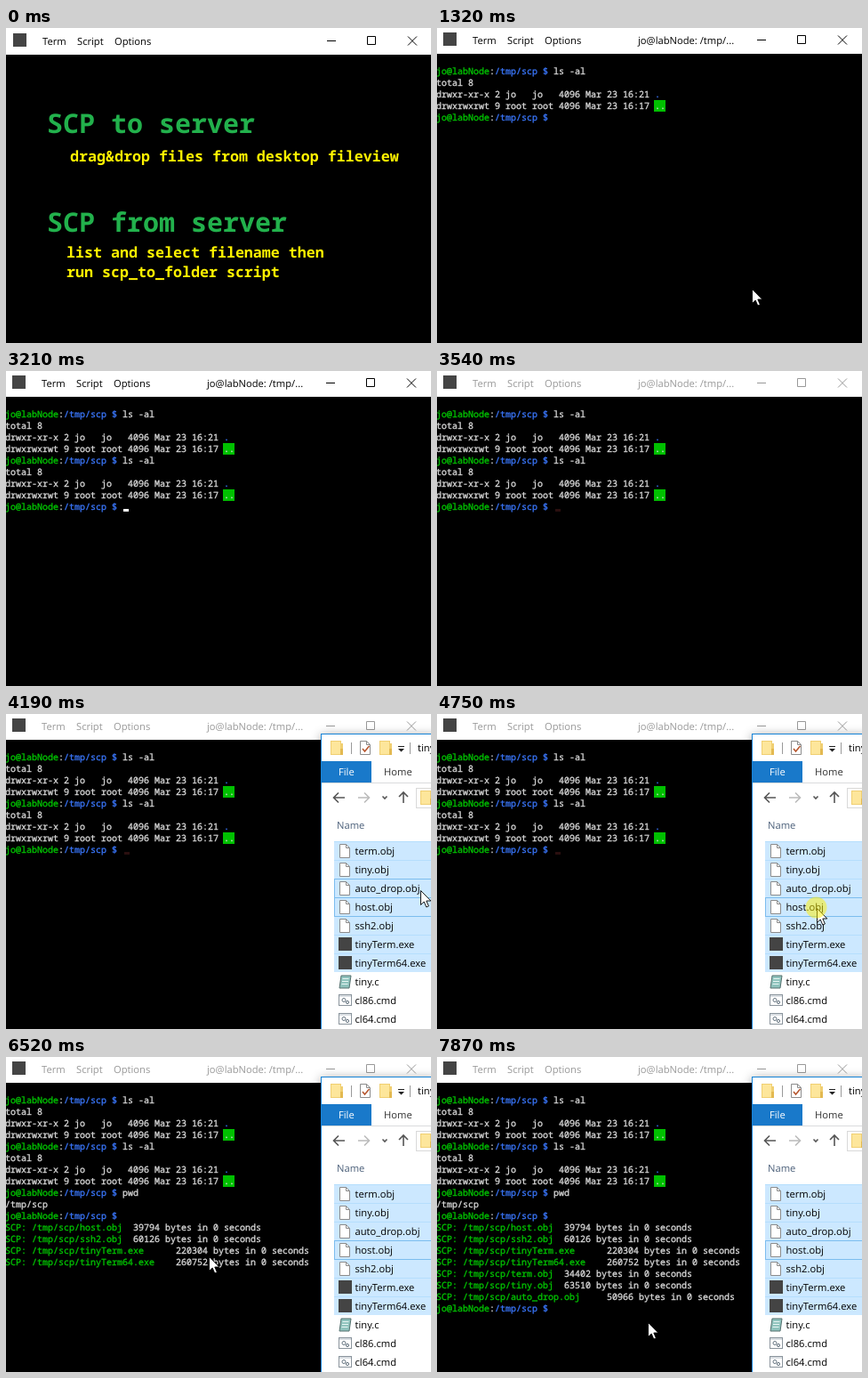
Write an HTML page that moves like this. It is 478 px wide and 354 px high and loops after 8000 ms.

```html
<!DOCTYPE html>
<html lang="en">
<head>
<meta charset="utf-8">
<style>
html, body { margin: 0; width: 100%; height: 100%; overflow: hidden; background: #000; }
svg { display: block; width: 100vw; height: 100vh; }
text { white-space: pre; text-rendering: geometricPrecision; }
.ui { font: 11.2px "Open Sans", "Noto Sans", sans-serif; }
.mono { font: 10px "Noto Sans Mono", "DejaVu Sans Mono", monospace; stroke-width: .3; }
.big { font: bold 30px "Noto Sans Mono", monospace; fill: #22b14c; }
.mid { font: bold 16.67px "Noto Sans Mono", monospace; fill: #fff200; }
.line { fill: none; stroke-width: 1; }
</style>
</head>
<body>
<svg id="stage" viewBox="0 0 478 354">
  <defs>
    <filter id="shadow" x="-20%" y="-10%" width="140%" height="120%">
      <feDropShadow dx="0" dy="2" stdDeviation="6" flood-color="#000" flood-opacity=".4"/>
    </filter>
    <g id="folder">
      <path d="M0 0h12v3h2v13H0z" fill="#f0cf72"/>
      <path d="M1 1h10v14H1z" fill="#fde69b"/>
      <path d="M11 9h3v7h-3z" fill="#e3b951"/>
    </g>
    <g id="page">
      <path d="M1.500 .5h7l4 4v11h-11z" fill="#fff" stroke="#8c8c8c"/>
      <path d="M8.500 .5v4h4" class="line" stroke="#8c8c8c"/>
    </g>
    <rect id="app" width="15" height="15" fill="#444"/>
    <g id="note">
      <path d="M3 1h11l-2 14H1z" fill="#8fc3bd" stroke="#55716f"/>
      <path d="M4.500 4.500h7M4 7.500h7M3.500 10.500h7" class="line" stroke="#e8f6f4"/>
    </g>
    <g id="batch">
      <rect x=".5" y="1.500" width="14" height="12" fill="#fff" stroke="#8a949c"/>
      <path d="M1 3h13" class="line" stroke="#b5bec6"/>
      <circle cx="6" cy="7.500" r="2" class="line" stroke="#63727e"/>
      <circle cx="10" cy="10" r="1.600" class="line" stroke="#63727e"/>
    </g>
  </defs>
  <rect width="478" height="354"/>

  <g id="intro">
    <text class="big" x="46" y="118">SCP to server</text>
    <text class="mid" x="72" y="150">drag&amp;drop files from desktop fileview</text>
    <text class="big" x="46" y="229">SCP from server</text>
    <text class="mid" x="68" y="258">list and select filename then</text>
    <text class="mid" x="68" y="280">run scp_to_folder script</text>
  </g>

  <g id="term" class="mono"></g>
  <rect id="caret" width="6" height="3"/>

  <g id="bar">
    <rect x="-1" y="-1" width="480" height="30" fill="#fff"/>
    <use href="#app" x="7" y="5"/>
    <g id="menu" class="ui">
      <text x="40" y="18">Term</text>
      <text x="79" y="18">Script</text>
      <text x="121" y="18">Options</text>
      <text id="title" x="226" y="18">jo@labNode: /tmp/...</text>
    </g>
    <path id="buttons" class="line" d="M360 13.500h10M405.500 8.500h9v9h-9zM451 8.500l10 10M461 8.500l-10 10"/>
  </g>

  <g id="explorer" class="ui">
    <rect x="354.500" y="22.500" width="130" height="340" fill="#fff" stroke="#1883d7" filter="url(#shadow)"/>
    <use href="#folder" x="365" y="30"/>
    <use href="#page" x="397" y="30"/>
    <path d="M401 39l2.500 3 5-6" class="line" stroke="#b5532a" style="stroke-width:1.500"/>
    <use href="#folder" x="420" y="30"/>
    <path d="M388.500 32v13M454.500 32v13" class="line" stroke="#999"/>
    <path d="M441 36h7v1h-7zM441 39h7l-3.500 3.500z" fill="#222"/>
    <text x="463" y="42">tiny</text>
    <rect x="355" y="53" width="56" height="24" fill="#1979ca"/>
    <text x="374" y="69" fill="#fff">File</text>
    <text x="425" y="69" fill="#333">Home</text>
    <path d="M355 77.500h123" class="line" stroke="#dadbdc"/>
    <g class="line" style="stroke-width:1.600">
      <path d="M381 94h-12M374 88.500l-5.500 5.500 5.500 5.500" stroke="#555"/>
      <path d="M396 94h12M403 88.500l5.500 5.500-5.500 5.500" stroke="#bbb"/>
      <path d="M423.500 92.500l2.500 2.500 2.500-2.500" stroke="#555"/>
      <path d="M447 100v-12M442 93l5-5 5 5" stroke="#555"/>
    </g>
    <rect x="461.500" y="83.500" width="30" height="22" fill="#fff" stroke="#d9d9d9"/>
    <use href="#folder" x="466" y="86"/>
    <text x="372" y="129" fill="#4c607a">Name</text>
    <g id="files"></g>
    <g class="line" stroke="#7cbdee">
      <rect x="369.500" y="206.500" width="120" height="21"/>
      <rect id="hover" x="369.500" y="185.500" width="120" height="21"/>
    </g>
  </g>

  <g id="mouse">
    <path d="M.5 .5v16l3.700-3.500 2.600 6 2.600-1.100-2.600-5.900h5z" fill="#fff" stroke="#000" stroke-width=".9"/>
    <g id="copy">
      <rect x="2.500" y="15.500" width="11" height="7" class="line" stroke="#ddd" stroke-dasharray="1.500 1.500"/>
      <rect x="10" y="20" width="9" height="9" fill="#fff"/>
      <path d="M12 24.500h5M14.500 22v5" class="line" stroke="#000"/>
    </g>
    <circle id="press" cx="-.5" cy="-.5" r="12" fill="#fff000" opacity=".5"/>
  </g>
</svg>
<script>
const LOOP = 8000, OPEN = 1320, BLUR = 3540, EXPLORE = 3640, PRESS = 4410, DROP = 5860;
const GREEN = "#00c800", BLUE = "#3b78ff", PALE = "#dcdcdc";
const $ = id => document.getElementById(id);

function add(parent, tag, attrs, text) {
  const el = document.createElementNS("http://www.w3.org/2000/svg", tag);
  for (const k in attrs) el.setAttribute(k, attrs[k]);
  if (text) el.textContent = text;
  parent.append(el);
  return el;
}
const show = (el, on) => el.setAttribute("visibility", on ? "visible" : "hidden");
const ink = color => ({ fill: color, stroke: color });

// Terminal output: each piece appears at its own time
const pieces = [];
function print(row, at, ...parts) {
  const text = add($("term"), "text", { x: -1, y: 52 + 13 * row });
  for (const [color, s] of parts) add(text, "tspan", ink(color), s);
  pieces.push({ el: text, at });
}
const prompt = (row, at, cmd = "") => print(row, at,
  [GREEN, "jo@labNode"], [PALE, ":"], [BLUE, "/tmp/scp $ "], [PALE, cmd]);
function listing(row, at) {
  const mark = add($("term"), "rect", { x: 244, y: 68 + 13 * row, width: 13, height: 13, fill: "#00c000" });
  pieces.push({ el: mark, at });
  print(row, at, [PALE, "total 8"]);
  print(row + 1, at, [PALE, "drwxr-xr-x 2 jo   jo   4096 Mar 23 16:21 "], [BLUE, "."]);
  print(row + 2, at, [PALE, "drwxrwxrwt 9 root root 4096 Mar 23 16:17 .."]);
}
function copied(row, at, name, size) {
  const head = "SCP: /tmp/scp/" + name;
  print(row, at, [GREEN, head.padEnd(Math.ceil(head.length / 8) * 8)],
    [PALE, size + " bytes in 0 seconds"]);
}

prompt(0, OPEN, "ls -al");
listing(1, OPEN);
prompt(4, OPEN);
const typed = add($("term"), "text", { x: 131, y: 104, ...ink(PALE) });
listing(5, 2100);
prompt(8, 2220);
print(8, DROP, [PALE, "pwd".padStart(25)]);
print(9, DROP, [PALE, "/tmp/scp"]);
prompt(10, DROP);
[["host.obj", 39794, 5960], ["ssh2.obj", 60126, 6180], ["tinyTerm.exe", 220304, 6300],
 ["tinyTerm64.exe", 260752, 6520], ["term.obj", 34402, 6740], ["tiny.obj", 63510, 6860],
 ["auto_drop.obj", 50966, 7080]].forEach(([name, size, at], i) => copied(11 + i, at, name, size));
prompt(18, 7080);

// Explorer rows, the first seven selected
const icons = { obj: "page", exe: "app", c: "note", cmd: "batch" };
["term.obj", "tiny.obj", "auto_drop.obj", "host.obj", "ssh2.obj", "tinyTerm.exe",
 "tinyTerm64.exe", "tiny.c", "cl86.cmd", "cl64.cmd"].forEach((name, i) => {
  const y = 143 + 21 * i, box = $("files");
  if (i < 7) {
    add(box, "rect", { x: 369, y, width: 109, height: 21, fill: "#cce8ff" });
    add(box, "path", { d: `M369 ${y + .5}h109`, class: "line", stroke: "#b5defd" });
  }
  add(box, "use", { href: "#" + icons[name.split(".")[1]], x: 374, y: y + 3 });
  add(box, "text", { x: 392.5, y: y + 15 }, name);
});

// Pointer stops: time, x, y; a lone time hides it
const stops = [
  [0], [1320, 354, 293], [2770, 392, 284], [2880, 446, 264], [2990],
  [3870, 474, 120], [3980, 473, 150], [4080, 470, 178], [4190, 466, 198],
  [4310, 458, 212], [4410, 452, 217], [4520, 450, 217], [4630, 444, 217],
  [4750, 427, 218], [4970, 380, 158], [5080, 326, 130], [5190, 275, 168],
  [5290, 238, 223], [5410, 231, 224], [5530, 228, 224],
  [7630, 230, 245], [7740, 235, 280], [7870, 237, 298]
];
const keys = [[1440, "l"], [1550, "ls"], [1660, "ls -"], [1770, "ls -a"], [1880, "ls -al"]];
const last = (list, t) => list.filter(k => k[0] <= t).pop();

function caretAt(t) {
  if (t >= 1440 && t < 2100) return [132 + 6 * typed.textContent.length, 103, "#fff"];
  if (t >= 2220 && t < 2770 || t >= 3210 && t < BLUR) return [132, 155, "#fff"];
  if (t >= BLUR && t < DROP) return [133, 155, "#2a0f0f"];
}

function draw(t) {
  const open = t >= OPEN, blurred = t >= BLUR;
  show($("intro"), !open);
  show($("title"), open);
  $("bar").setAttribute("transform", open ? "" : "translate(1 1)");
  $("menu").setAttribute("fill", blurred ? "#999" : "#000");
  $("buttons").setAttribute("stroke", blurred ? "#999" : "#000");
  for (const p of pieces) show(p.el, t >= p.at);

  typed.textContent = (last(keys, t) || [0, ""])[1];
  const caret = caretAt(t);
  show($("caret"), caret);
  if (caret) ["x", "y", "fill"].forEach((k, i) => $("caret").setAttribute(k, caret[i]));

  $("explorer").setAttribute("display", t >= EXPLORE ? "inline" : "none");
  $("hover").setAttribute("display", t >= 4080 && t < 4310 ? "inline" : "none");

  const [, x, y] = last(stops, t);
  const held = t >= PRESS && t < DROP;
  $("mouse").setAttribute("display", x ? "inline" : "none");
  if (x) $("mouse").setAttribute("transform", `translate(${x} ${y})`);
  show($("press"), held);
  show($("copy"), held && x < 355);
}

const start = performance.now();
function tick() {
  draw((performance.now() - start) % LOOP);
  requestAnimationFrame(tick);
}
tick();
</script>
</body>
</html>
```
